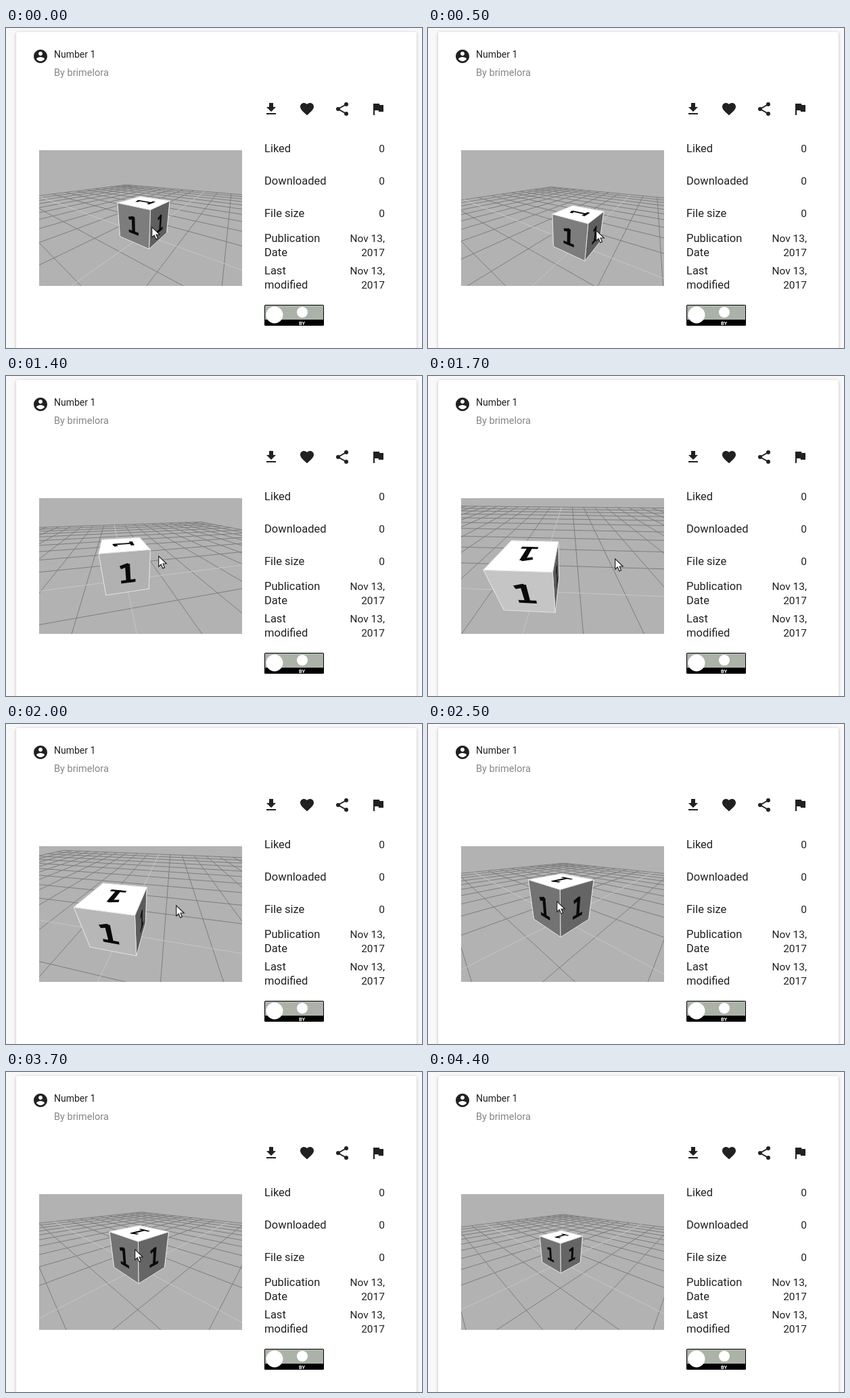
Write an HTML page with a canvas that moves like this. It is 615 px wide and 474 px high and loops after 5.2 s.

```html
<!DOCTYPE html>
<html lang="en">
<head>
<meta charset="utf-8">
<title>Model page</title>
<style>
  html, body { margin: 0; width: 100%; height: 100%; overflow: hidden; background: #f8f8f8; }
  #stage { position: relative; width: 615px; height: 474px; overflow: hidden; }
  #card { position: absolute; left: 15px; top: 6px; width: 592px; height: 490px; background: #fff;
          border-radius: 2px; box-shadow: 0 1px 4px rgba(0, 0, 0, .25); }
  svg, canvas { position: absolute; left: 0; top: 0; }
  #view { left: 49px; top: 181px; }
  text { font: 16.5px Roboto, sans-serif; fill: #212121; }
  .end { font-size: 15.5px; text-anchor: end; }
  .icon { fill: #212121; }
</style>
</head>
<body>
<div id="stage">
  <div id="card"></div>
  <svg width="615" height="474">
    <g class="icon">
      <path transform="translate(39 30)" d="M12 2C6.48 2 2 6.48 2 12s4.48 10 10 10 10-4.48 10-10S17.52 2 12 2zm0 3c1.66 0 3 1.34 3 3s-1.34 3-3 3-3-1.34-3-3 1.34-3 3-3zm0 14.2c-2.5 0-4.71-1.28-6-3.22.03-1.99 4-3.08 6-3.08 1.99 0 5.97 1.09 6 3.08-1.29 1.94-3.5 3.22-6 3.22z"/>
      <path transform="translate(380 108)" d="M19 9h-4V3H9v6H5l7 7 7-7zM5 18v2h14v-2H5z"/>
      <path transform="translate(433 108)" d="M12 21.35l-1.45-1.32C5.4 15.36 2 12.28 2 8.5 2 5.42 4.42 3 7.5 3c1.74 0 3.41.81 4.5 2.09C13.09 3.81 14.76 3 16.5 3 19.58 3 22 5.42 22 8.5c0 3.78-3.4 6.86-8.55 11.54L12 21.35z"/>
      <g transform="translate(485 108)">
        <path d="M18 5L6 12l12 7" fill="none" stroke="#212121" stroke-width="2"/>
        <circle cx="18" cy="5" r="3"/><circle cx="6" cy="12" r="3"/><circle cx="18" cy="19" r="3"/>
      </g>
      <path transform="translate(538 108)" d="M14.4 6L14 4H5v17h2v-7h5.6l.4 2h7V6z"/>
    </g>
    <text x="71" y="44" style="font-size:14px">Number 1</text>
    <text x="71" y="71" style="font-size:14.5px;fill:#858585">By brimelora</text>
    <g id="facts"></g>
    <rect x="382" y="410" width="88" height="31" rx="1.5" fill="#000"/>
    <rect x="383" y="411" width="86" height="21" fill="#abb3a9"/>
    <circle cx="397" cy="425" r="12.5" fill="#fff"/>
    <circle cx="438" cy="421" r="8" fill="#fff"/>
    <text x="437.5" y="439.5" text-anchor="middle" style="font:bold 7.5px Roboto,sans-serif;fill:#fff">BY</text>
  </svg>
  <canvas id="view" width="300" height="201"></canvas>
  <svg id="cursor" width="16" height="22">
    <path d="M.7 .9V16.3L4.3 13 6.7 18.9 9.5 17.7 7.1 12H12.2Z" fill="#fff" stroke="#222" stroke-width="1.2"/>
  </svg>
</div>
<script>
const LOOP = 5200, STEP = 100, POINTER_GONE = 4400;
const FOCAL = 100 / Math.tan(Math.PI / 6), NEAR = 0.05;
const VIEW = { x: 49, y: 181, cx: 150, cy: 100 };

// x, y: where the cube's base centre appears; px, py: pointer tip
const START = { yaw: -81.4, pitch: 21.6, dist: 3.5, x: 204, y: 306, px: 215, py: 294 };

// Each move eases only the values it names
const MOVES = [
  { from: 0, to: 100, px: 213, py: 284 },
  // pan
  { from: 200, to: 500, x: 220.5, y: 320.5, px: 248, py: 299 },
  { from: 500, to: 1000, x: 189, y: 291, px: 191, py: 263 },
  // orbit
  { from: 1200, to: 1700, yaw: 42.1, pitch: 36.5, dist: 2.66, x: 159, y: 319, px: 276, py: 270 },
  { from: 1700, to: 1800, yaw: 46, pitch: 40 },
  { from: 1800, to: 2500, yaw: -0.5, pitch: 28.8, dist: 3.02, x: 197, y: 289, px: 190, py: 262 },
  // zoom
  { from: 2600, to: 3100, dist: 2.4, y: 300 },
  { from: 3200, to: 3400, dist: 2.75, y: 293 },
  { from: 3500, to: 4100, dist: 4.36, y: 282 },
  // pointer leaves
  { from: 4000, to: 4100, px: 290, py: 311 },
  { from: 4100, to: 4300, px: 377, py: 167 },
];

const FACTS = [
  [['Liked'], ['0']],
  [['Downloaded'], ['0']],
  [['File size'], ['0']],
  [['Publication', 'Date'], ['Nov 13,', '2017']],
  [['Last', 'modified'], ['Nov 13,', '2017']],
];

const ctx = document.getElementById('view').getContext('2d');
const cursor = document.getElementById('cursor');
const mix = (a, b, k) => a + (b - a) * k;

document.getElementById('facts').innerHTML = FACTS.map(([labels, values], row) => {
  const lines = (items, attrs) => items.map((item, i) => {
    const y = 184 + 48 * row + 21 * (i - (items.length - 1) / 2);
    return `<text ${attrs} y="${Math.floor(y)}">${item}</text>`;
  }).join('');
  return lines(labels, 'x="382"') + lines(values, 'class="end" x="560"');
}).join('');

function stateAt(t) {
  const state = { ...START };
  for (const { from, to, ...goal } of MOVES) {
    const k = Math.min(1, (t - from) / (to - from));
    if (k <= 0) continue;
    for (const key in goal) state[key] = mix(state[key], goal[key], k);
  }
  return state;
}

function makeCamera({ yaw, pitch, dist, x: sx, y: sy }) {
  const rad = Math.PI / 180, turn = (45 - yaw) * rad, tilt = pitch * rad;
  const ct = Math.cos(turn), st = Math.sin(turn), cp = Math.cos(tilt), sp = Math.sin(tilt);
  const ox = dist * (sx - VIEW.x - VIEW.cx) / FOCAL;
  const oy = -dist * (sy - VIEW.y - VIEW.cy) / FOCAL;
  const rotate = ([x, y]) => [x * ct + y * st, y * ct - x * st];
  const project = ([x, y, z]) => {
    const [right, ahead] = rotate([x, y]);
    return [right + ox, ahead * sp + z * cp + oy, ahead * cp - z * sp + dist];
  };
  return { rotate, project };
}

const toScreen = ([x, y, d]) => [VIEW.cx + FOCAL * x / d, VIEW.cy - FOCAL * y / d];

function clipNear(a, b) {
  if (a[2] >= NEAR) return a;
  const k = (NEAR - a[2]) / (b[2] - a[2]);
  return a.map((v, i) => mix(v, b[i], k));
}

function drawLine(camera, from, to, color) {
  const a = camera.project(from), b = camera.project(to);
  if (a[2] < NEAR && b[2] < NEAR) return;
  ctx.strokeStyle = color;
  ctx.beginPath();
  ctx.moveTo(...toScreen(clipNear(a, b)));
  ctx.lineTo(...toScreen(clipNear(b, a)));
  ctx.stroke();
}

function drawGrid(camera) {
  ctx.lineWidth = 1;
  const pair = (i, color) => {
    drawLine(camera, [i, -10, 0], [i, 10, 0], color);
    drawLine(camera, [-10, i, 0], [10, i, 0], color);
  };
  for (let i = -10; i <= 10; i++) if (i) pair(i, '#7c7c7c');
  pair(0, '#c6c6c6');
}

// Quad around a segment of a unit face, v pointing down
function bar([u1, v1], [u2, v2], width = 0.08) {
  const len = Math.hypot(u2 - u1, v2 - v1);
  const du = (v1 - v2) / len * width / 2, dv = (u2 - u1) / len * width / 2;
  return [[u1 + du, v1 + dv], [u2 + du, v2 + dv], [u2 - du, v2 - dv], [u1 - du, v1 - dv]];
}
const DIGIT = [
  bar([.37, .34], [.54, .29]),
  bar([.52, .27], [.52, .73], .1),
  bar([.36, .7], [.68, .7]),
];
const SQUARE = bar([0, .5], [1, .5], 1).reverse();

function trace(points) {
  ctx.beginPath();
  points.forEach(p => ctx.lineTo(...p));
  ctx.closePath();
}

function drawFace(camera, origin, u, v, shade) {
  const place = ([a, b]) =>
    toScreen(camera.project(origin.map((o, i) => o + a * u[i] + b * v[i])));
  trace(SQUARE.map(place));
  ctx.fillStyle = `rgb(${shade},${shade},${shade})`;
  ctx.fill();
  ctx.strokeStyle = '#e4e4e4';
  ctx.lineWidth = 1;
  ctx.lineJoin = 'round';
  ctx.stroke();
  ctx.fillStyle = '#0a0a0a';
  for (const stroke of DIGIT) {
    trace(stroke.map(place));
    ctx.fill();
  }
}

function drawCube(camera) {
  const sides = [[0, -1], [1, 0], [0, 1], [-1, 0]].map(([nx, ny]) => {
    const [right, ahead] = camera.rotate([nx, ny]);
    const centre = camera.project([nx / 2, ny / 2, 0]), base = camera.project([0, 0, 0]);
    return { nx, ny, right, facing: -ahead, depth: centre[2],
             visible: centre[0] / centre[2] * right < base[0] / base[2] * right || -ahead > 0 };
  });
  sides.sort((a, b) => b.depth - a.depth);
  for (const { nx, ny, right, facing } of sides) {
    const light = 102 + 95 * Math.max(0, facing) ** 8 - 10 * right;
    drawFace(camera, [(nx + ny) / 2, (ny - nx) / 2, 1], [-ny, nx, 0], [0, 0, -1], Math.round(light));
  }
  drawFace(camera, [.5, -.5, 1], [-1, 0, 0], [0, 1, 0], 255);
}

function render(t) {
  const state = stateAt(t), camera = makeCamera(state);
  ctx.fillStyle = '#b2b2b2';
  ctx.fillRect(0, 0, 300, 201);
  drawGrid(camera);
  drawCube(camera);
  cursor.style.transform = `translate(${Math.round(state.px)}px, ${Math.round(state.py)}px)`;
  cursor.style.visibility = t < POINTER_GONE ? 'visible' : 'hidden';
}

const start = performance.now();
function tick() {
  const t = (performance.now() - start) % LOOP;
  render(Math.floor(t / STEP) * STEP);
  requestAnimationFrame(tick);
}
tick();
</script>
</body>
</html>
```
